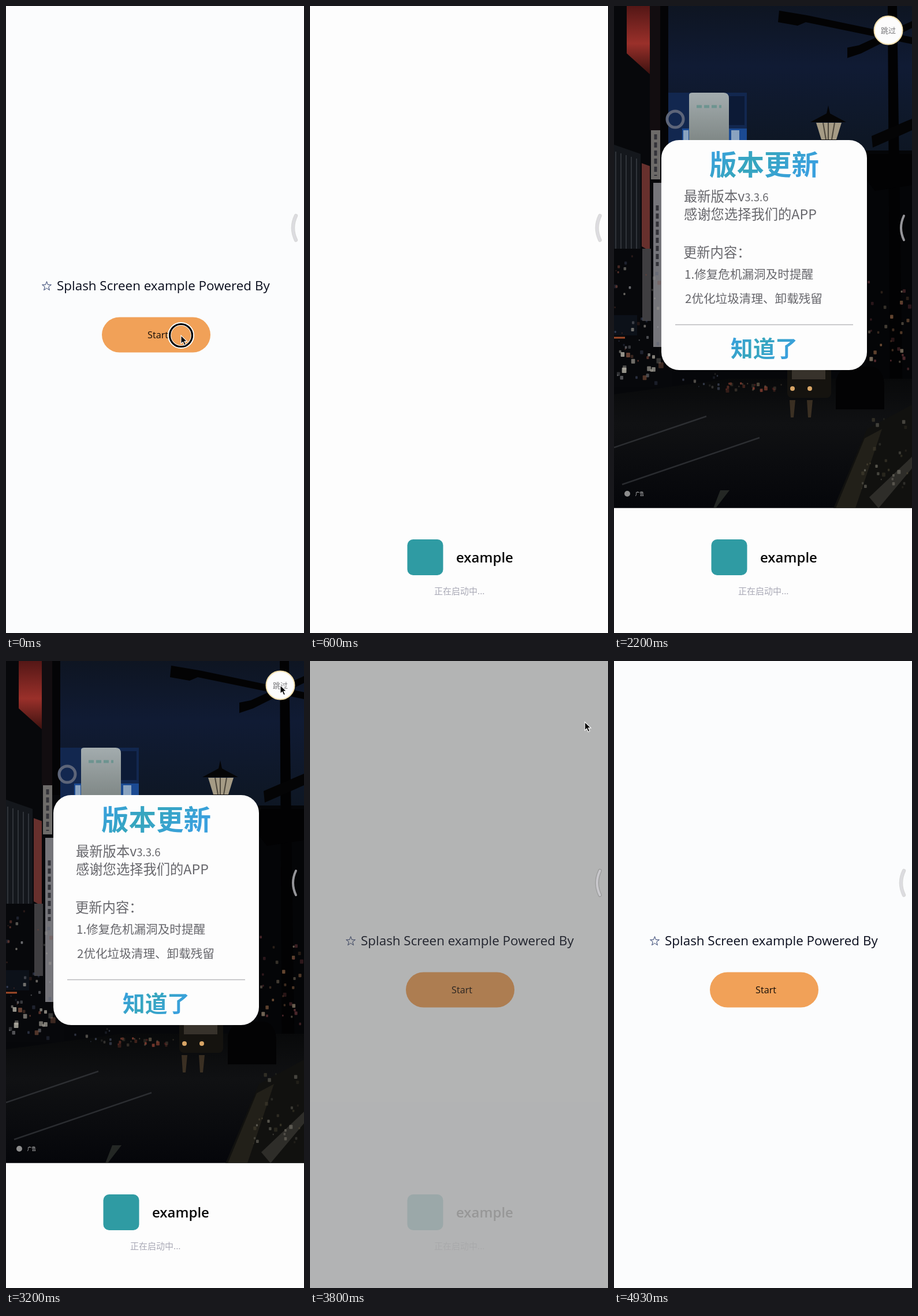
An HTML page for the animation above (4.99 s loop, 516 by 1085 pixels).

```html
<!DOCTYPE html>
<html lang="zh-CN">
<head>
<meta charset="utf-8">
<title>Splash screen</title>
<style>
  html, body { margin: 0; width: 100%; height: 100%; overflow: hidden; background: #fcfcfd; }
  svg { display: block; width: 516px; height: 1085px; }
  text { font-family: "Noto Sans CJK SC", "Noto Sans CJK", sans-serif; }
  .latin { font-family: "Open Sans", "Noto Sans", sans-serif; }
  .mid { text-anchor: middle; }
  .body { fill: #66666b; font-size: 23.3px; }
  .item { fill: #66666b; font-size: 20.6px; }
</style>
</head>
<body>
<svg viewBox="0 0 516 1085" xmlns="http://www.w3.org/2000/svg">
  <defs>
    <linearGradient id="sky" x2="0" y2="1">
      <stop offset="0" stop-color="#0e1522"/>
      <stop offset=".12" stop-color="#101b34"/>
      <stop offset=".27" stop-color="#0e1725"/>
      <stop offset=".7" stop-color="#06070a"/>
    </linearGradient>
    <linearGradient id="road" x2="0" y2="1">
      <stop offset="0" stop-color="#08090a"/>
      <stop offset=".35" stop-color="#101113"/>
      <stop offset="1" stop-color="#05060a"/>
    </linearGradient>
    <linearGradient id="redSign" x2="0" y2="1">
      <stop offset="0" stop-color="#541716"/>
      <stop offset=".55" stop-color="#9a302a"/>
      <stop offset="1" stop-color="#3c1210"/>
    </linearGradient>
    <linearGradient id="board" x2="0" y2="1">
      <stop offset="0" stop-color="#a3acae"/>
      <stop offset="1" stop-color="#7d8583"/>
    </linearGradient>
    <linearGradient id="title" x2="1" y2=".4">
      <stop offset="0" stop-color="#3a9fe6"/>
      <stop offset=".5" stop-color="#36a6bd"/>
      <stop offset="1" stop-color="#3aa0de"/>
    </linearGradient>
  </defs>

  <g id="start">
    <rect width="516" height="1085" fill="#fbfcfd"/>
    <polygon id="star" fill="none" stroke="#2b3c6c" stroke-width="1"/>
    <text class="latin" x="88" y="492" font-size="22.4" fill="#080c1c">Splash Screen example Powered By</text>
    <rect x="166" y="538.5" width="188" height="61" rx="30.5" fill="#f1a158"/>
    <text class="latin mid" x="263" y="575" font-size="16.2" fill="#150d08">Start</text>
  </g>

  <g id="splash">
    <rect width="516" height="1085" fill="#fdfdfd"/>
    <rect x="168.5" y="923" width="62" height="62" rx="10" fill="#2f9ba3"/>
    <text class="latin" x="253" y="963" font-size="24" font-weight="600" fill="#080808">example</text>
    <text x="215" y="1017.5" font-size="15" fill="#a9a9b6">正在启动中...</text>
  </g>

  <g id="ad">
    <svg width="516" height="868.5">
      <rect width="516" height="869" fill="url(#sky)"/>
      <!-- left side of the street -->
      <path d="M0 0H92V150H100V660H0Z" fill="#07080b"/>
      <path d="M22 0H62V118L22 82Z" fill="url(#redSign)"/>
      <path d="M62 0H80V215H62Z" fill="#120d10"/>
      <path d="M80 0H94V232H80Z" fill="#040406"/>
      <path d="M0 240L46 256V420H0Z" fill="#14171c"/>
      <path d="M3 252V420M12 255V420M21 258V420M30 261V420M39 264V420" stroke="#30343a" stroke-width="2"/>
      <path d="M48 272L62 277V424L48 416Z" fill="#67302d"/>
      <path d="M64 215H80V300H64Z" fill="#6d6b69"/>
      <path d="M68 306H82V590H68Z" fill="#75757a"/>
      <path d="M72 222V294M75 345V450" stroke="#34343a" stroke-width="5" stroke-dasharray="9 5"/>
      <path d="M49 420H64V545H49Z" fill="#3f3e41"/>
      <path d="M94 150H230V240H94Z" fill="#12274f"/>
      <path d="M199 156H226V206H199Z" fill="#0c1a36"/>
      <circle cx="106" cy="196" r="14" fill="none" stroke="#5d6579" stroke-width="5"/>
      <path d="M118 212H230V240H118Z" fill="#1b4a92"/>
      <path d="M130 154Q130 150 136 150H190Q199 150 199 160V240H130Z" fill="url(#board)"/>
      <path d="M143 174H186" stroke="#6d9490" stroke-width="5" stroke-dasharray="9 4"/>
      <path d="M120 215H129V232H120ZM203 215H217V232H203Z" fill="#8aa3c0"/>
      <path d="M0 535H40V570H0Z" fill="#0c1119"/>
      <path d="M0 574H19" stroke="#a04a28" stroke-width="3"/>
      <!-- right side -->
      <path d="M436 250H516V650H436Z" fill="#040507"/>
      <path d="M286 8L334 16L516 54V66L332 28L318 34L284 28Z" fill="#030304"/>
      <path d="M404 72L424 68L516 26V38L428 82L404 90Z" fill="#030304"/>
      <path d="M474 0H490L500 700H478Z" fill="#020203"/>
      <path d="M446 225L516 195V215L448 245Z" fill="#040405"/>
      <path d="M436 256H516V310L452 320L436 300Z" fill="#020203"/>
      <path d="M371 172L374 186L402 201H340L368 186Z" fill="#050506"/>
      <path d="M350 202H394L385 231H359Z" fill="#a59b85"/>
      <path d="M362 202L367 231M382 202L377 231M371 202V231" stroke="#4d473c" stroke-width="2"/>
      <path d="M357 231H387L379 250H365Z" fill="#050506"/>
      <!-- road -->
      <path d="M0 672L200 645H516V869H0Z" fill="url(#road)"/>
      <path d="M14 828L252 747M0 764L160 710" stroke="#4a4d52" stroke-width="2.5" opacity=".5"/>
      <path d="M172 869L184 838H200L176 869Z" fill="#383c36" opacity=".6"/>
      <path d="M380 869L438 732L516 690V869Z" fill="#11110f"/>
      <path d="M384 869L434 748L464 732L418 869Z" fill="#3d372a" opacity=".4"/>
      <path d="M442 850L516 780V800L458 869Z" fill="#4c4a44" opacity=".5"/>
      <rect x="300" y="622" width="76" height="56" rx="8" fill="#15130f"/>
      <rect x="308" y="630" width="58" height="16" fill="#37322b"/>
      <path d="M384 692V650Q388 626 412 624H446Q464 626 468 652V698H384Z" fill="#030304"/>
      <g id="lights"></g>
      <g fill="#d8a566">
        <circle cx="309" cy="662" r="4"/><circle cx="339" cy="662" r="4"/>
        <path d="M304 682H314L311 712H306ZM334 682H344L341 712H336Z" opacity=".22"/>
      </g>
      <circle cx="23" cy="844" r="5" fill="#8d8d8d"/>
      <text x="37" y="847" font-size="7.5" fill="#e4e4e4">广告</text>
    </svg>

    <rect x="82" y="232" width="356" height="398" rx="31" fill="#fdfdfd"/>
    <text class="mid" x="260" y="292" font-size="47.5" font-weight="700" fill="url(#title)">版本更新</text>
    <text class="body" x="121" y="338">最新版本v<tspan font-size="18.5">3.3.6</tspan></text>
    <text class="body" x="121" y="369">感谢您选择我们的APP</text>
    <text class="body" x="120" y="435">更新内容：</text>
    <text class="item" x="122" y="472">1.修复危机漏洞及时提醒</text>
    <text class="item" x="123" y="514">2优化垃圾清理、卸载残留</text>
    <path d="M106 551.5H414" stroke="#b9b9bd" stroke-width="1.3"/>
    <text class="mid" x="260" y="607" font-size="38.7" font-weight="700" fill="url(#title)">知道了</text>

    <circle cx="475" cy="42" r="24.5" fill="#fcfcfc" stroke="#f3dfae" stroke-width="2"/>
    <text class="mid" x="475" y="46.5" font-size="13" fill="#77777a">跳过</text>
  </g>

  <rect id="dim" width="516" height="1085"/>

  <g fill="none" stroke-linecap="round">
    <path d="M502 363Q492 384 502 405" stroke="#000" stroke-opacity=".14" stroke-width="6.5"/>
    <path d="M502 363Q492 384 502 405" stroke="#dedce2" stroke-opacity=".67" stroke-width="4"/>
  </g>

  <g id="cursor">
    <g id="ring" fill="none">
      <circle r="20" stroke="#fff" stroke-width="6"/>
      <circle r="19.5" stroke="#000" stroke-width="3.2"/>
    </g>
    <path d="M0 0V14.5L3.4 11.4L5.8 17L8.4 15.9L6 10.4H10.6Z" fill="#000" stroke="#fff" stroke-width="1.1"/>
  </g>
</svg>

<script>
const LOOP = 4990;
const $ = id => document.getElementById(id);

// Each row: time, value(s)
const splashFade = [[180, 0], [400, .52], [570, 1], [3480, 1], [3670, .5], [3860, 0]];
const dimFade = [[130, 0], [400, .57], [600, 0], [3400, 0], [3670, .67], [3900, 0]];
const cursorPath = [
  [0, 303, 570], [130, 303, 570], [270, 385, 622], [400, 461, 664], [540, 530, 700],
  [2860, 530, 110], [3200, 475, 42], [3400, 475, 42], [3670, 481, 81],
  [4130, 463, 167], [4300, 478, 205], [4500, 530, 260]
];
const AD = [670, 3400];
const PRESS = [[0, 130], [3260, 3400]];
const AWAY = [[540, 2860], [4500, LOOP]];

const within = (t, [a, b]) => t >= a && t < b;

function at(rows, t, col = 1) {
  if (t <= rows[0][0]) return rows[0][col];
  for (let i = 1; i < rows.length; i++) {
    const a = rows[i - 1], b = rows[i];
    if (t < b[0]) return a[col] + (b[col] - a[col]) * (t - a[0]) / (b[0] - a[0]);
  }
  return rows[rows.length - 1][col];
}

function drawStar(cx, cy, r) {
  const pts = [];
  for (let i = 0; i < 10; i++) {
    const a = (i / 5 - .5) * Math.PI, d = i % 2 ? r * .4 : r;
    pts.push((cx + d * Math.cos(a)).toFixed(1) + ',' + (cy + d * Math.sin(a)).toFixed(1));
  }
  $('star').setAttribute('points', pts.join(' '));
}

let seed = 17;
const rand = () => (seed = seed * 16807 % 2147483647) / 2147483647;

// Scatter small lit windows and lamps over an area
function lights(n, x, y, w, h, size, colors) {
  let out = '';
  for (let i = 0; i < n; i++) {
    const px = x + rand() * w, py = y + rand() * h, s = size * (.5 + rand());
    const color = colors[Math.floor(rand() * colors.length)];
    out += `<rect x="${px.toFixed(1)}" y="${py.toFixed(1)}" width="${s.toFixed(1)}" ` +
      `height="${(s * 1.2).toFixed(1)}" rx="1" fill="${color}" opacity="${(.25 + rand() * .5).toFixed(2)}"/>`;
  }
  return out;
}

drawStar(70.5, 485, 8.3);
$('lights').innerHTML =
  lights(45, 0, 430, 78, 220, 4, ['#8d8d92', '#a8a39a', '#7a4438', '#4a5470']) +
  lights(14, 8, 595, 70, 45, 6, ['#c7c2b6', '#a0644a']) +
  lights(34, 438, 470, 72, 165, 4, ['#8f6444', '#a8957c', '#683438']) +
  lights(26, 184, 650, 112, 13, 4, ['#842c28', '#a04a38', '#6b5c4a']) +
  lights(12, 104, 635, 78, 28, 3, ['#5c5852', '#454c60']) +
  lights(30, 426, 710, 85, 130, 4, ['#4a4434', '#6e6b62']);

function render(t) {
  $('splash').style.opacity = at(splashFade, t);
  $('ad').style.display = within(t, AD) ? '' : 'none';
  $('dim').style.opacity = at(dimFade, t);
  $('cursor').setAttribute('transform',
    `translate(${at(cursorPath, t).toFixed(2)} ${at(cursorPath, t, 2).toFixed(2)})`);
  $('cursor').style.display = AWAY.some(s => within(t, s)) ? 'none' : '';
  $('ring').style.display = PRESS.some(s => within(t, s)) ? '' : 'none';
}

const begin = performance.now();
function tick(now) {
  render(Math.max(0, now - begin) % LOOP);
  requestAnimationFrame(tick);
}
render(0);
requestAnimationFrame(tick);
</script>
</body>
</html>
```
